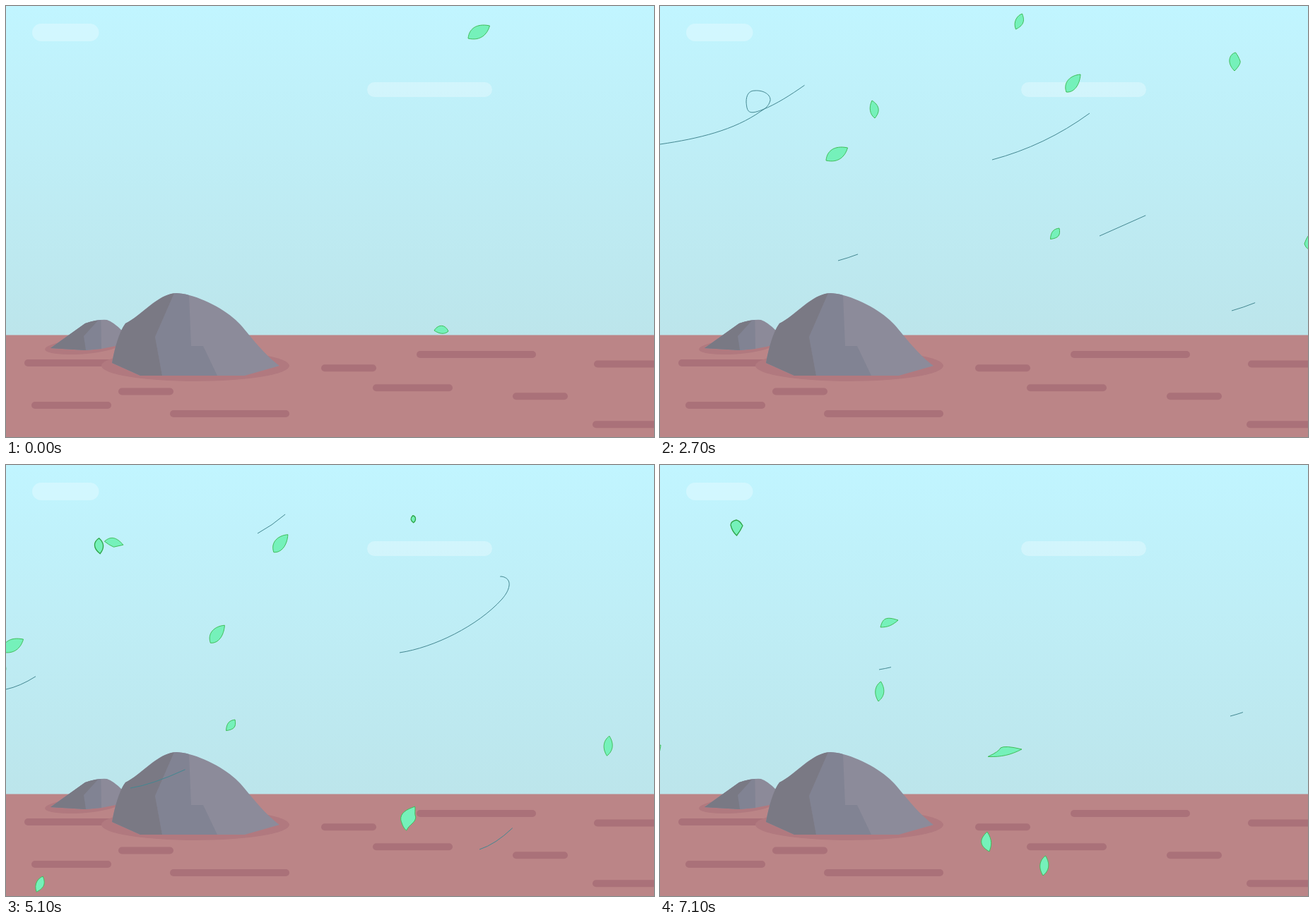
An HTML page that plays this animation: 917 px wide and 611 px high, repeating every 7200 ms.

```html
<!DOCTYPE html>
<html lang="en">
<head>
<meta charset="utf-8">
<title>Leaves in the wind</title>
<style>
  html, body { margin: 0; width: 100%; height: 100%; overflow: hidden; }
  svg { display: block; width: 100vw; height: 100vh; }
  .wind { fill: none; stroke: #438791; stroke-width: 1; }
  .leaf { fill: #75f1ba; stroke: #40bd58; stroke-width: 1; stroke-linejoin: round; }
  .dark { stroke: #2fa548; stroke-width: 1.3; }
</style>
</head>
<body>
<svg viewBox="0 0 917 611" preserveAspectRatio="none">
  <defs>
    <linearGradient id="sky" x1="0" y1="0" x2="0" y2="1">
      <stop offset="0" stop-color="#c1f5ff"/>
      <stop offset="1" stop-color="#bce5eb"/>
    </linearGradient>
  </defs>
  <rect width="917" height="467" fill="url(#sky)"/>
  <g fill="#fff" fill-opacity=".28">
    <rect x="37" y="25" width="94.5" height="25" rx="12.5"/>
    <rect x="511" y="108" width="177" height="21" rx="10.5"/>
  </g>
  <rect y="466.5" width="917" height="144.5" fill="#bb8587"/>
  <g id="stripes" fill="#aa7179"></g>
  <ellipse cx="108" cy="483" rx="53" ry="10.5" transform="rotate(-4 108 483)" fill="#b1797f"/>
  <path fill="#8c8a99" d="M63 485 112 450Q130 444 143 445 152 448 164 460L160 481 135 486 113 488Z"/>
  <path fill="#818393" d="M63 485 112 450Q126 445 134.500 445L135 486 113 488Z"/>
  <path fill="#797984" d="M63 485 112 450Q122 446.500 130 446L110 468 113 488Z"/>
  <ellipse cx="268" cy="510" rx="133" ry="22" fill="#b1797f"/>
  <path fill="#8c8b9a" d="M150 506C154 484 160 462 169 450 192 439 214 408 241 407 270 408 314 431 332 452 346 468 366 495 387 510L338 524H190Z"/>
  <path fill="#818393" d="M238 407.300Q248 406.500 259 410L262 482H279L299 524H221L211 469Z"/>
  <path fill="#7a7984" d="M150 506C154 484 160 462 169 450 192 439 214 410 238 407.300L211 469 221 524H190Z"/>
  <g id="winds"></g>
  <g id="leaves"></g>
</svg>
<script>
const LOOP = 7200, STEP = 100;

const add = (parent, tag, attrs) => {
  const el = document.createElementNS('http://www.w3.org/2000/svg', tag);
  for (const k in attrs) el.setAttribute(k, attrs[k]);
  return parent.appendChild(el);
};
const byId = id => document.getElementById(id);
const clamp = v => Math.max(0, Math.min(1, v));

// Ground stripes: x, y, width
[[26, 501, 169], [36, 561, 113], [159, 541.5, 78], [232, 573, 169], [446, 508.2, 78],
 [519, 536.3, 113], [581, 489, 169], [717, 548.2, 78], [832, 502.5, 113], [830, 588.2, 113]]
  .forEach(([x, y, width]) => add(byId('stripes'), 'rect', { x, y, width, height: 10, rx: 5 }));

// Gusts: the head draws a path, then the tail wipes it
const gusts = [
  { head: 206, tail: 1521, dur: 1397, paths: [
    'M817 150C800 185 782 212 766 226S742 243 732 243C717 242 708 229 708 215C709 197 724 184 742 183C759 183 768 199 767 214C767 224 764 232 760 240C745 268 715 284 687 297L622 326',
    'M413 265Q368 307 315 336Q285 352 252 361',
    'M990 305Q955 348 917 376Q900 390 882 401Q848 421 809 432'] },
  { head: 914, tail: 2401, dur: 1397, paths: [
    'M289 52L205 112C185 126 165 139 145 147S123 150 122 136C122 126 126 120 134 120C147 119 157 126 156 134C154 142 148 146 143 149C105 176 55 188 0 196L-53 202',
    'M639 124Q630 133 620 142L608 152Q545 198 470 218'] },
  { head: 2857, tail: 4296, dur: 1397, paths: [
    'M440 23Q424 44 405 61Q382 83 356 97',
    'M92 262Q72 279 52 293Q24 313 0 318',
    'M354 383L282 418Q215 452 176 458',
    'M888 51C820 108 745 175 705 189C692 192 685 188 684 179C685 167 693 158 701 158C709 159 713 164 712 171C711 178 707 184 702 190C668 228 605 259 557 266',
    'M762 453Q748 481 728 503Q698 536 670 545'] },
  { head: 5267, tail: 6200, dur: 1000, paths: [
    'M464 211Q443 229 417 245Q362 282 310 290',
    'M136 396Q112 418 83 432Q25 462 -40 468',
    'M953 245Q935 275 912 297Q865 341 807 356'] },
];
for (const g of gusts)
  g.els = g.paths.map(d => {
    const el = add(byId('winds'), 'path', { d, class: 'wind' });
    return { el, len: el.getTotalLength() };
  });

const shape = {
  wide: 'M-15 9C-14-4-4-13 15.500-9C12 3 3 13-15 9Z',
  lens: 'M-10 0C-6-7 4-11 10 1C5 6-3 5-10 0Z',
  small: 'M-6.500 7.500C-6-3-2-7 6-8C8 2 5 6-6.500 7.500Z',
  left: 'M-3-12C3-8 12 0 1 13C-6 8-8-2-3-12Z',
  right: 'M4.500-11C-2-9-9 0-4.500 11C3 7 10 2 4.500-11Z',
  plump: 'M1.500-13C-7-11-12 1 0 13C5 8 9 2 8-1C6-6 4-10 1.500-13Z',
  big: 'M11-13C-3-12-14-2-9 12C2 13 10 2 11-13Z',
  flat: 'M-13-1C-4-9 4-7 13.500 4L0 7Q-7 4-13-1Z',
  tilt: 'M7-14C-2-13-7-1-9 5C-7 12-2 14 3 15C8 8 11-3 7-14Z',
  bent: 'M9-17C-3-13-12-8-11 2C-9 9-7 14-3 17C1 8 10 6 10-2C8-7 10-12 9-17Z',
  slim: 'M1-14C-5-10-6-3-3 14C3 9 6 4 5 0Q5-9 1-14Z',
  tall: 'M1.500-14C-7-8-9 3-2 14C6 8 9-2 1.500-14Z',
  kite: 'M1-14C-9-5-12 5 4 14C7 6 9-2 1-14Z',
  oval: 'M0-11C-8-6-9 3 1.500 11C7 4 8-4 0-11Z',
  tiny: 'M-1-5C-5-1-4 2 0 5C4 2 4-4-1-5Z',
  drop: 'M0-11Q-8-9-8-4Q-6 5 .5 11Q6 4 9-3Q5-10 0-11Z',
  wing: 'M-12 7C-9-5-5-9 13-3C5 4-1 7-12 7Z',
  blade: 'M-24 7.500Q-8 0-6-5Q0-9 24-3C8 5-4 8-24 7.500Z',
};

// Flocks: keys are time, x, y; leaves are shape, dx, dy
const trio = [['big', 0, 0], ['flat', -146, -131], ['tall', 554, 158], ['kite', 705, 371]];
const flocks = [
  { keys: [[0, 669, 37], [1100, 519, 163], [2700, 250, 210], [3500, 182, 240], [4500, 92, 260], [5600, -70, 249], [7200, -350, 230]],
    leaves: [['wide', 0, 0], ['lens', -53, 423], ['small', 309, 113]] },
  { keys: [[1500, 680, -245], [2700, 508, 22], [3500, 396, 198], [4500, 174, 433], [5600, -56, 733]],
    leaves: [['left', -205, 124], ['right', 0, 0], ['plump', 305, 57], ['tilt', 413, 310], ['bent', 522, -93], ['slim', -53, -307]] },
  { keys: [[1800, 630, -70], [2700, 584, 110], [3500, 547, 265], [4500, 403, 243], [5600, 194, 235], [7100, -243, 163], [7200, -272, 158]],
    leaves: trio },
  { keys: [[3500, 690, -190], [4500, 499, 9], [5600, 294, 191], [7100, -10, 410], [7200, -30, 425]],
    leaves: trio },
  { keys: [[4500, 672, -78], [5600, 472, 192], [7100, -128, 382], [7200, -168, 394]],
    leaves: [['tiny', 0, 0, 1], ['oval', -445, 38, 1], ['drop', 236, -293, 1], ['wing', 452, -159], ['blade', 616, 24]] },
];
for (const f of flocks) {
  f.el = add(byId('leaves'), 'g', {});
  for (const [name, x, y, dark] of f.leaves)
    add(f.el, 'path', { d: shape[name], class: dark ? 'leaf dark' : 'leaf', transform: `translate(${x} ${y})` });
}

// Smooth curve through the keys, column c
function glide(keys, t, c) {
  let i = 0;
  while (i < keys.length - 2 && t > keys[i + 1][0]) i++;
  const last = keys.length - 1;
  const slope = j => {
    const chord = k => (keys[k + 1][c] - keys[k][c]) / (keys[k + 1][0] - keys[k][0]);
    if (j === 0) return chord(0);
    if (j === last) return chord(last - 1);
    const a = keys[j][0] - keys[j - 1][0], b = keys[j + 1][0] - keys[j][0];
    return (chord(j - 1) * b + chord(j) * a) / (a + b);
  };
  const [p, q] = [keys[i], keys[i + 1]], d = q[0] - p[0], s = (t - p[0]) / d, r = 1 - s;
  return p[c] * r * r * (1 + 2 * s) + q[c] * s * s * (3 - 2 * s)
    + d * s * r * (slope(i) * r - slope(i + 1) * s);
}

function draw(t) {
  for (const g of gusts) {
    const head = clamp((t - g.head) / g.dur), tail = clamp((t - g.tail) / g.dur);
    for (const { el, len } of g.els) {
      el.style.display = head > tail ? '' : 'none';
      el.setAttribute('stroke-dasharray', `0 ${tail * len} ${(head - tail) * len} ${len * 2}`);
    }
  }
  for (const f of flocks) {
    const on = t >= f.keys[0][0] && t <= f.keys[f.keys.length - 1][0];
    f.el.style.display = on ? '' : 'none';
    if (on) f.el.setAttribute('transform', `translate(${glide(f.keys, t, 1)} ${glide(f.keys, t, 2)})`);
  }
}

let start;
function tick(now) {
  start ??= now;
  draw(Math.floor(((now - start) % LOOP) / STEP) * STEP);
  requestAnimationFrame(tick);
}
draw(0);
requestAnimationFrame(tick);
</script>
</body>
</html>
```
